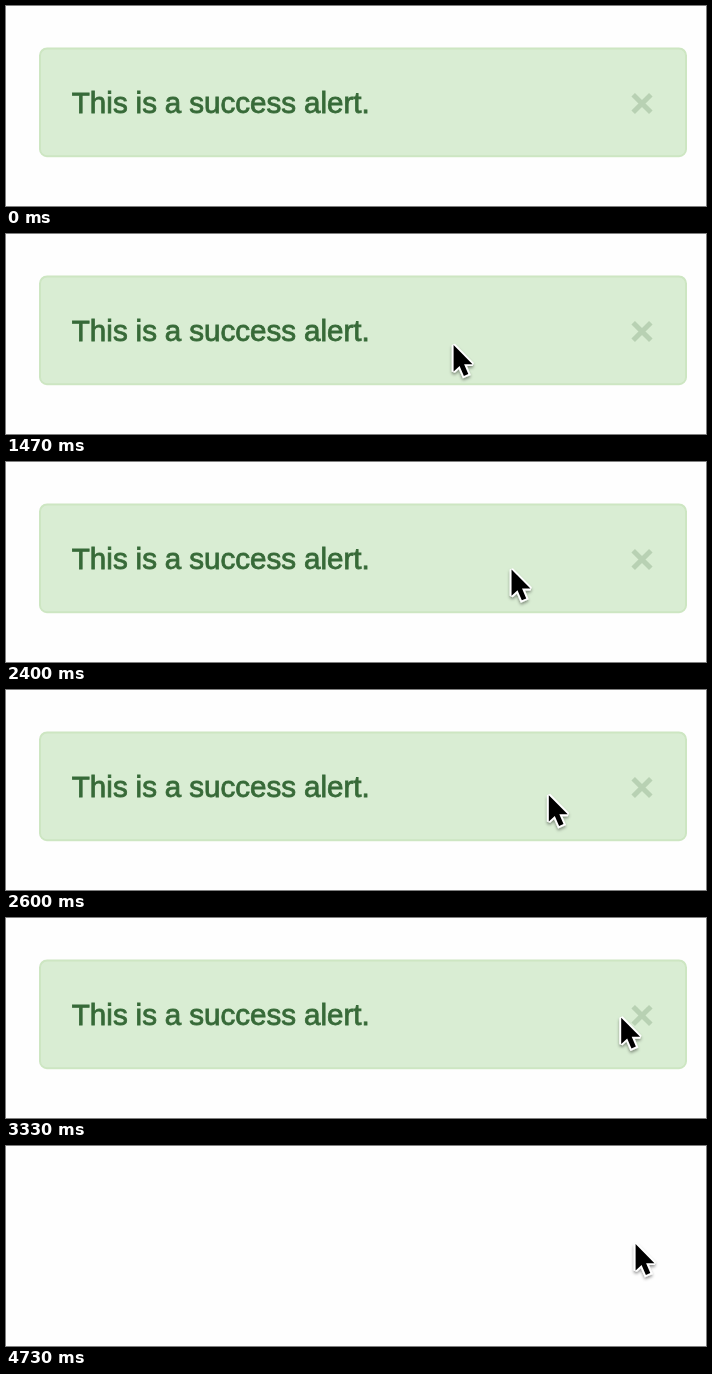
Animation, 700 px wide and 200 px high, one loop 6.8 s. Source, as an HTML page:

```html
<!DOCTYPE html>
<html lang="en">
<head>
<meta charset="utf-8">
<title>Dismissible alert</title>
<style>
html, body { margin: 0; width: 100%; height: 100%; overflow: hidden; background: #fefefe; }
svg { display: block; width: 100%; height: 100%; }
text { font-family: "Liberation Sans", Arial, sans-serif; font-size: 29.6px; word-spacing: -.35px; }
</style>
</head>
<body>
<svg viewBox="0 0 700 200">
  <defs>
    <filter id="soft" x="-40%" y="-40%" width="180%" height="180%">
      <feGaussianBlur stdDeviation=".45"/>
      <feDropShadow dx="0" dy="2" stdDeviation="1.7" flood-color="#000" flood-opacity=".4"/>
    </filter>
  </defs>
  <g id="alert">
    <rect x="34" y="42.4" width="646" height="107.8" rx="7" fill="#d9edd3" stroke="#cde6c2" stroke-width="2"/>
    <text x="65.8" y="106.8" fill="#376a38" stroke="#376a38" stroke-width=".8">This is a success alert.</text>
    <path id="close" d="M627.2 88.7l17.6 17.6m0-17.6l-17.6 17.6" fill="none" stroke-width="5"/>
  </g>
  <g id="cursor">
    <g id="arrow" filter="url(#soft)" transform="translate(.6 .6) scale(1.05)">
      <path d="M0 .5V25.5L5.7 20.3L9.8 29.8L14 28L10 18.7H18Z" stroke="#fff" stroke-width="3.6" paint-order="stroke" stroke-miterlimit="2"/>
    </g>
    <g id="hand" filter="url(#soft)" stroke="#000" stroke-width="2" stroke-linejoin="round" stroke-linecap="round">
      <path fill="#fff" d="M-2.6 5C-4 1.6 1.6-.4 3 3.2L5.6 11C6 8.4 10.6 8.4 11 11.4C11.8 9 15.8 9.2 16.2 12.6C17.4 10.8 20.6 11.6 20.6 15V20.5C20.6 24.5 18 26 17.6 32.5H2.4C1.6 28.5-1 27-3.2 23.5L-8.4 17.6C-11 14.4-7.4 11.8-4.6 14.2L-.2 18Z"/>
      <path fill="none" d="M5.8 20V27M10.4 20V27M15 20V27"/>
    </g>
  </g>
</svg>
<script>
const LOOP = 6800, FPS = 15;
const ENTER = 17, HOVER = 52, DISMISS = 71;
const moves = [
  { from: 17, to: 22, a: [433, 174], b: [447, 110] },
  { from: 32, to: 45, a: [447, 110], b: [591, 101] },
  { from: 45, to: 55, a: [591, 101], b: [629, 97] }
];
const el = id => document.getElementById(id);
const show = (id, on) => el(id).setAttribute("display", on ? "inline" : "none");
const easeOut = u => 1 - (1 - u) ** 1.4;

function position(tick) {
  const { from, to, a, b } = moves.findLast(m => tick >= m.from) || moves[0];
  const u = Math.min(1, Math.max(0, (tick - from) / (to - from)));
  return a.map((v, i) => v + (b[i] - v) * easeOut(u));
}

function draw(ms) {
  const tick = Math.floor((ms % LOOP + 4) * FPS / 1000);
  const hover = tick >= HOVER && tick < DISMISS;
  show("alert", tick < DISMISS);
  show("cursor", tick >= ENTER);
  show("arrow", !hover);
  show("hand", hover);
  el("close").setAttribute("stroke", hover ? "#6d776a" : "#b8d1b3");
  el("cursor").setAttribute("transform", `translate(${position(tick)})`);
}

const start = performance.now();
function loop(now) {
  draw(Math.max(0, now - start));
  requestAnimationFrame(loop);
}
draw(0);
requestAnimationFrame(loop);
</script>
</body>
</html>
```
